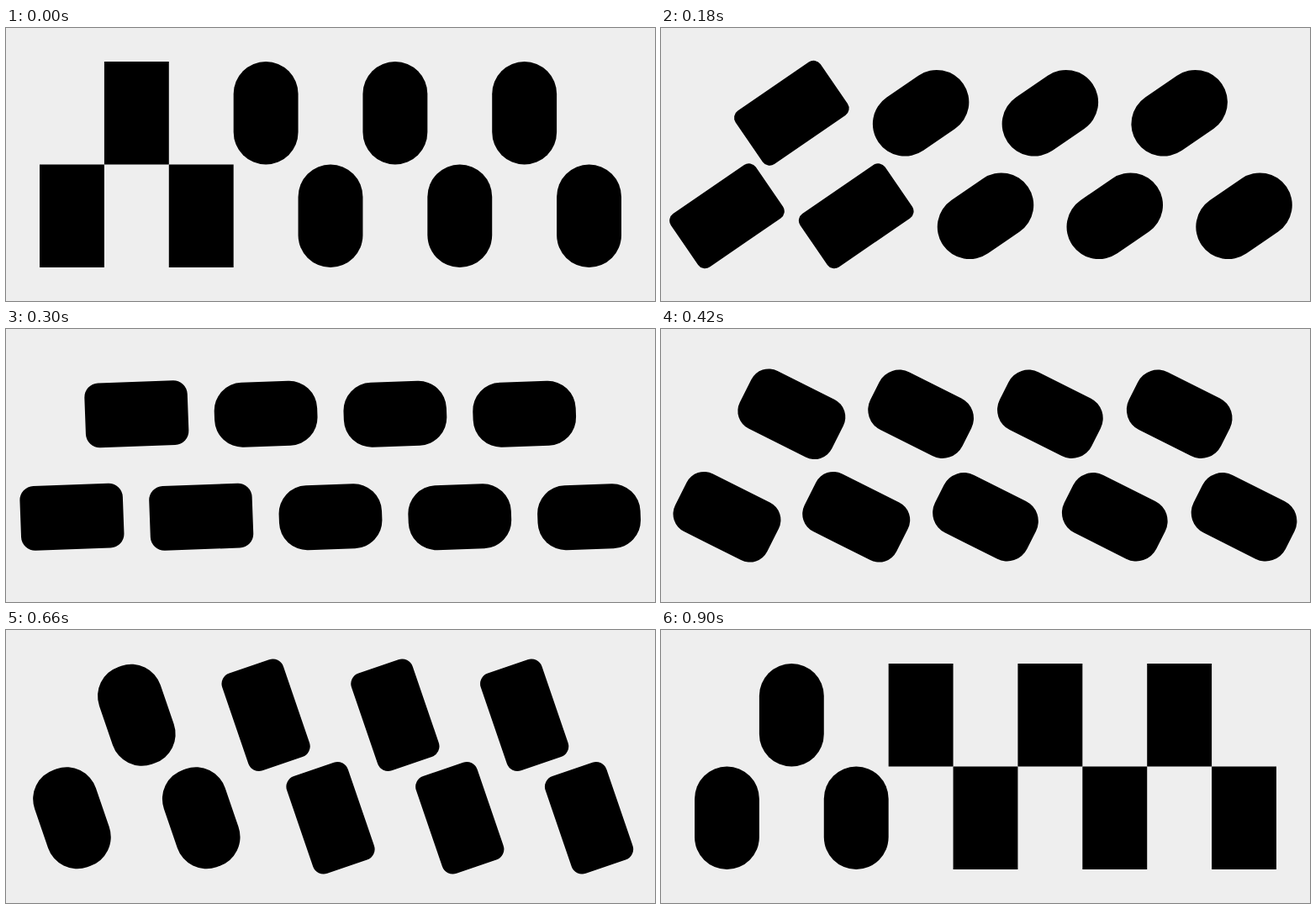
Animation, 772 px wide and 325 px high, one loop 1.9 s. Source, as an HTML page:

```html
<!DOCTYPE html>
<html lang="en">
<head>
<meta charset="utf-8">
<title>Turning tiles</title>
<style>
  html, body { margin: 0; width: 100%; height: 100%; overflow: hidden; background: #eee; }
  svg { display: block; width: 772px; height: 325px; }
</style>
</head>
<body>
<svg id="stage" viewBox="0 0 772 325"></svg>
<script>
  const LOOP = 1900, TURN = 900, STEP = 30;
  const COUNT = 9, MARGIN = 40, MAX_RADIUS = 50;
  const W = (772 - 2 * MARGIN) / COUNT, H = (325 - 2 * MARGIN) / 2;
  const stage = document.getElementById('stage');

  const tiles = Array.from({ length: COUNT }, (_, i) => {
    const rect = document.createElementNS('http://www.w3.org/2000/svg', 'rect');
    const x = MARGIN + W * i;
    const y = MARGIN + (i % 2 ? 0 : H);
    for (const [name, value] of Object.entries({ x, y, width: W, height: H })) {
      rect.setAttribute(name, value);
    }
    stage.append(rect);
    return { rect, cx: x + W / 2, cy: y + H / 2, rounding: i < 3 };
  });

  // cubic-bezier(0, 0, 0.58, 1), solved for x by bisection
  function easeOut(x) {
    if (x >= 1) return 1;
    let low = 0, high = 1;
    for (let i = 0; i < 30; i++) {
      const s = (low + high) / 2;
      if (1.74 * s * s - 0.74 * s ** 3 < x) low = s; else high = s;
    }
    return 3 * low * low - 2 * low ** 3;
  }

  function draw(ms) {
    const time = Math.floor((ms % LOOP) / STEP) * STEP;
    const t = Math.min(time / TURN, 1);
    const angle = 180 * easeOut(t);
    for (const { rect, cx, cy, rounding } of tiles) {
      const radius = Math.min(MAX_RADIUS * (rounding ? t : 1 - t), W / 2);
      rect.setAttribute('rx', radius);
      rect.setAttribute('ry', radius);
      rect.setAttribute('transform', `rotate(${angle} ${cx} ${cy})`);
    }
  }

  let start;
  function tick(now) {
    start ??= now;
    draw(now - start);
    requestAnimationFrame(tick);
  }
  draw(0);
  requestAnimationFrame(tick);
</script>
</body>
</html>
```
